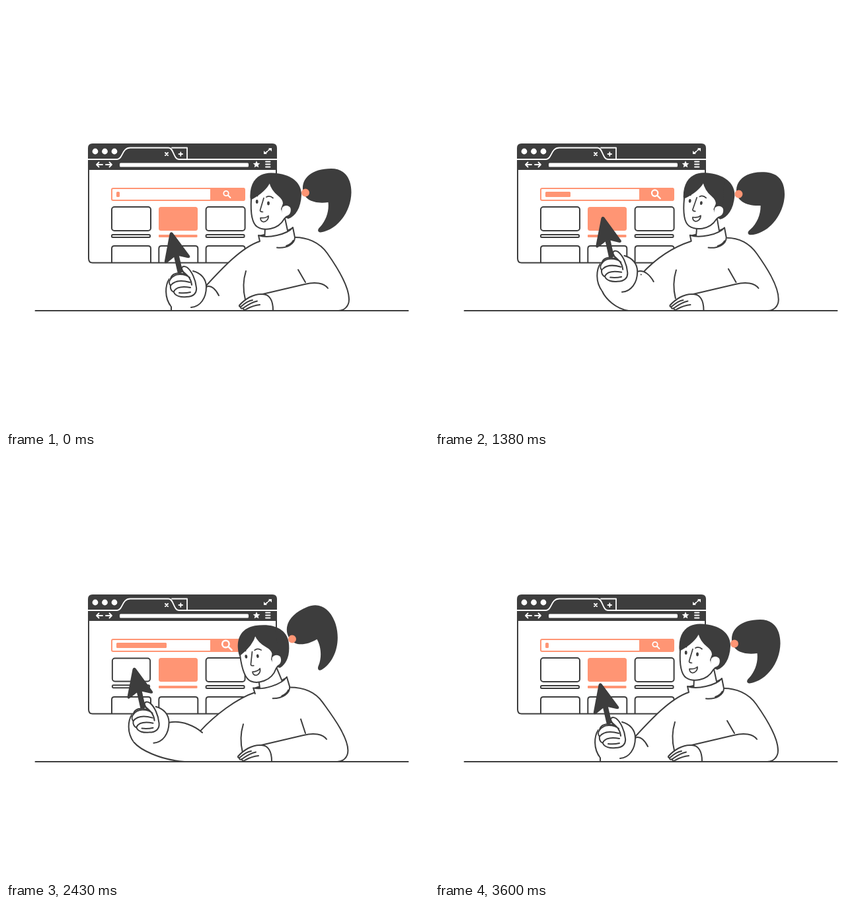
An HTML page for the animation above (3630 ms loop, 640x640 px).

```html
<!DOCTYPE html>
<html lang="en">
<head>
<meta charset="utf-8">
<title>Browsing</title>
<style>
  html, body { margin: 0; width: 100%; height: 100%; overflow: hidden; background: #fff; }
  svg { display: block; width: 100vw; height: 100vh; }
  .l { fill: none; stroke: #3d3d3d; stroke-width: 2; stroke-linecap: round; stroke-linejoin: round; }
  .p { fill: #fff; }
  .d { fill: #3d3d3d; }
  .o { fill: #ff9574; }
  .w { fill: none; stroke: #fff; stroke-width: 1.8; stroke-linecap: round; stroke-linejoin: round; }
  .thin { stroke-width: 1.7; }
</style>
</head>
<body>
<svg viewBox="0 0 640 640">
  <!-- browser window -->
  <path class="d" d="M124 248V215Q124 208 131 208H403Q410 208 410 215V248Z"/>
  <path class="l" d="M125 246V382Q125 388.500 131 388.500H409V246"/>
  <path class="w" d="M124 232H168C177 232 175 214.500 188 214.500H246C254 214.500 253 232 262 232H410M251 214.500H274V232"/>
  <g id="dots" fill="#fff">
    <rect x="172" y="237.500" width="195" height="6" rx="1.500"/>
    <path id="star"/>
    <path d="M402 215V220L397 215ZM390 224V219L395 224Z"/>
  </g>
  <path class="w" d="M241 222l4 4m0-4l-4 4M261.500 224h5.500m-2.700-2.700v5.500M393 222l2.500-2m1.500-1.500l3-2.500"/>
  <path class="w" d="M146 240H137m3.500-3.500l-3.500 3.500l3.500 3.500M151 240h9m-3.500-3.500l3.500 3.500l-3.500 3.500"/>
  <path class="w" d="M393 235.500h6.500m-6.500 4h6.500m-6.500 4h6.500"/>

  <!-- search field -->
  <rect x="160" y="276" width="201" height="18" rx="2" fill="#fff" stroke="#ff9574" stroke-width="2"/>
  <rect class="o" x="309" y="275" width="52" height="20" rx="2"/>
  <rect class="o" id="text" x="167" y="281" width="5" height="8" rx="1.500"/>
  <g id="lens" class="w"><circle cx="333" cy="283.500" r="3.700"/><path d="M336 286.500l3.500 3.500"/></g>

  <g id="cards"></g>

  <!-- head -->
  <g id="head">
    <path id="pony" class="d" d="M449 277C448 258 466 246 492 246C512 246 522.500 260 522.500 282C522 312 501 339 476 342.500C471 342.500 471 338 475 334.500C485 324 489 309 487.500 297C466 300 450 293 449 277Z"/>
    <path class="l p" d="M392 334L391 358H430L422 321"/>
    <path class="d" d="M369.500 291C368 266 381 252.500 401 252.500C427 253 447 264 447 286C446 306 438 318 427 322L400 310Z"/>
    <path class="l p" d="M371 292C370 310 371 328 380 334C389 340 411 340 421 322L426 317Q419 316 417 307L420 299C420 294 418 291 413 287C405 281 401 274 399 266C394 277 382 286 371 292Z"/>
    <path class="d" d="M369.500 293C380 286 394 280 399 264.500C401 275 408 284 417 290C420 292 421 297 420.500 303H430V262L400 257L375 268Z"/>
    <path class="p" d="M418 305C421 301 428 301 430.500 306C432 313 428 318 422 318C418 317 416 312 418 305Z"/>
    <path class="l thin" d="M375.500 288.500q2.500-2.500 5-1M394 289q5-3 10 1.500M390 290.500L384.500 309q0 2.500 4 2.500M385 320.500Q393 321.500 397 317.500C397.500 323 393 327 389 326.500Q385 325.500 385 320.500Z"/>
    <ellipse class="d" cx="379.700" cy="296" rx="1.900" ry="2.900"/><ellipse class="d" cx="397" cy="298.500" rx="1.900" ry="2.900"/>
    <circle class="o" cx="453" cy="282.500" r="6"/>
  </g>

  <!-- body -->
  <path id="fill" class="p"/>
  <path id="shoulder" class="l"/>
  <path id="back" class="l"/>
  <path id="chest" class="l" d="M363 401C358 417 359 432 362 444"/>
  <path id="pit" class="l"/>
  <g id="collar">
    <path class="d" d="M382 347L391 345L392 350ZM427 338L434 335L432 340L427 342Z"/>
    <path class="p" d="M382 347C396 352 425 346 434 335L438 352L400 366L384 357Z"/>
    <path class="l" d="M384 356L382 347C396 352 425 346 434 335L437 350C437 360 425 367 410 365.500M434.500 355Q432 360 424 363"/>
  </g>
  <g id="rest">
    <path class="p" d="M353 456C358 443 372 436 388 436L404 445V461H356Z"/>
    <path class="l" d="M487 427C481 419 468 417 452 421L388 436C399 436 404 446 404 460M388 436C374 435 361 444 353 453Q352.500 456 356 454.500C361 450 366 446 373 445M355 455.500Q355 459 359 457C366 452 372 448 380 446.500M359 458Q360 461 364 458.500Q374 453 384 452"/>
  </g>
  <path id="sleeve" class="l p"/>
  <path id="fold" class="l p"/>

  <!-- hand with pointer -->
  <g id="hand">
    <path class="p" d="M-3 69L31 57C43 58 53 68 53 81C53 98 44 111 30 112L0 110Z"/>
    <path class="l" d="M33 57C45 60 53 69 53 81C53 98 44 111 30 112"/>
    <path class="l p" d="M13 60C4 60 0 63 -1 69C-4 73 -3 77 -1 79C-2 84 1 88 4 89C6 95 15 97 23 96C34 96 39 90 38 82C37 70 31 57 24 51.500C18 48 14 51 17 56L20 62Z"/>
    <path class="d" transform="rotate(-13)" d="M-2.500 0Q0-3.500 2.500 0L19.500 39Q20.500 43 16.500 42L4 36V61L-4 62V36L-16.500 42Q-20.500 43-19.500 39Z"/>
    <path class="l" d="M18 58C25 64 30 68 31 78M-1 69Q4 62 13 62Q23 62 28 67M-1 79C5 71 17 71 28 74M4 88C8 80 18 80 29 82M12 90Q21 91 29 89"/>
  </g>
  <path class="l" d="M44.500 461H608.500"/>
</svg>
<script>
const LOOP = 3630, $ = id => document.getElementById(id);

const move = (id, value) => $(id).setAttribute('transform', value);
const draw = (id, d) => $(id).setAttribute('d', d);
const scale = (id, x, y, s) => move(id, `translate(${x} ${y}) scale(${s}) translate(${-x} ${-y})`);
const bump = (t, mid, width) => Math.exp(-(((t - mid) / width) ** 2));
const ease = (t, from, to) => {
  const u = Math.min(1, Math.max(0, (t - from) / (to - from)));
  return u * u * (3 - 2 * u);
};

function build() {
  const box = (cls, x, y, w, h, r) =>
    `<rect class="${cls}" x="${x}" y="${y}" width="${w}" height="${h}" rx="${r}"/>`;
  for (let i = 0; i < 3; i++) {
    const x = 160 + 71.3 * i;
    const cell = i === 1
      ? box('o', 231, 304, 59, 36, 3.5) + box('o', 231, 346, 58.5, 4, 1)
      : box('l', x, 304, 59, 36, 4) + box('l', x, 346, 58, 4, 1.5);
    $('cards').innerHTML += `<g id="card${i}">${cell}</g>`
      + `<path class="l" d="M${x} 388V367q0-4 4-4h51q4 0 4 4v21"/>`;
    $('dots').innerHTML += `<circle cx="${135 + 14.5 * i}" cy="220" r="4.4"/>`;
  }
  draw('star', 'M' + Array.from({ length: 10 }, (_, i) => {
    const r = i % 2 ? 2.6 : 5.6, a = i * Math.PI / 5;
    return `${379 + r * Math.sin(a)} ${239.8 - r * Math.cos(a)}`;
  }).join('L') + 'Z');
}

function drawWindow(t) {
  $('text').setAttribute('width',
    5 + 33 * ease(t, 0, 600) + 38 * ease(t, 1600, 2350) - 71 * ease(t, 2750, 3600));
  scale('lens', 334.5, 285, 1 + 0.27 * (1 - Math.cos(4 * Math.PI * t / LOOP)));
  scale('card0', 189.5, 322, 1 - 0.03 * bump(t, 2430, 150));
  scale('card1', 260.5, 322, 1 - 0.035 * bump(t, 880, 150));
}

function drawWoman(t) {
  // The lean drives head, collar and shoulders; the lift and reach drive the arm
  const lean = 9.5 * ease(t, 0, 560) - 17.5 * ease(t, 1000, 2000) + 8 * ease(t, 2900, 3600);
  const lift = ease(t, 0, 560) - ease(t, 3050, 3600);
  const hx = 250 + 14 * ease(t, 0, 560) - 70 * ease(t, 1050, 2430) + 56 * ease(t, 3000, 3600);
  const hy = 344 - 23.5 * lift;
  const sweep = bump(t, 1890, 300), wrist = 8 * sweep;
  const right = Math.max(0, lean), left = Math.min(0, lean);

  const turn = 0.65 * right + 1.3 * left;
  move('head', `translate(${lean} 0) rotate(${turn} 408 345)`);
  move('pony', `rotate(${0.7 * right + 1.45 * left - 3 * sweep} 453 282)`);
  move('collar', `translate(${lean} 0) rotate(${0.16 * right + 0.65 * left} 408 347)`);
  move('rest', `translate(${0.65 * right + 0.25 * left} 0)`);
  move('chest', `translate(${lean * 0.5} ${-lean * 0.4})`);
  draw('pit', `M${442 + (right - left) * 0.5} ${399 - (right - left) * 0.3}L${453 + right * 0.65} 418`);

  move('hand', `translate(${hx} ${hy}) rotate(${wrist})`);
  const a = wrist * Math.PI / 180, c = Math.cos(a), s = Math.sin(a);
  const at = (x, y) => [hx + x * c - y * s, hy + x * s + y * c];
  const [cx, cy] = at(53, 81), [px, py] = at(0, 111);

  const ex = hx + lift * (40 + 0.8 * Math.max(0, 240 - hx) - 2.4 * wrist);
  draw('sleeve', `M${at(-3, 69)}C${at(-9, 78)} ${at(-11, 97)} ${px} ${py}`
    + `C${px + (ex - px) * 0.12} ${Math.min(459, py + 11)} ${(px + ex) / 2} 458 ${ex} 461`);

  const ax = 303 + 1.5 * lean + 3 * lift, ay = 423 - lift * (14 + 0.7 * lean);
  const sx = 384 + lean * 0.85;
  const arm = `M${sx} 356C${sx - 28} 365 ${ax + 21} ${ay - 23} ${ax} ${ay}`;
  draw('shoulder', arm);

  const fx = ax + 19 + 2 * left, fy = 438 - 21 * lift, dx = fx - cx, dy = fy - cy;
  draw('fold', `M${cx} ${cy}C${cx + 0.4 * dx} ${cy - 4} ${fx - 0.2 * dx} ${fy - 0.6 * dy} ${fx} ${fy}`);

  const bx = 437 + lean, by = 350 + 0.2 * lean;
  const mx = 486 + 0.3 * right + 0.9 * left, my = 374 + 0.25 * right + 0.4 * left;
  const qx = 519 + 0.2 * lean;
  const back = `C${bx + 18} ${by} ${mx - 12} ${my - 17} ${mx} ${my}`
    + `C${mx + 12} ${my + 17} ${qx} 422 ${qx} 444C${qx} 455 ${qx - 8} 461 ${qx - 16} 461`;
  draw('back', `M${bx} ${by}${back}`);
  draw('fill', `${arm}L${cx} ${cy}L${px} ${py}L${ex} 461H${qx - 16}L${qx} 444L${mx} ${my}L${bx} ${by}Z`
    + `M${bx} ${by}${back}Z`);
}

function tick() {
  const t = performance.now() % LOOP;
  drawWindow(t);
  drawWoman(t);
  requestAnimationFrame(tick);
}

build();
tick();
</script>
</body>
</html>
```
